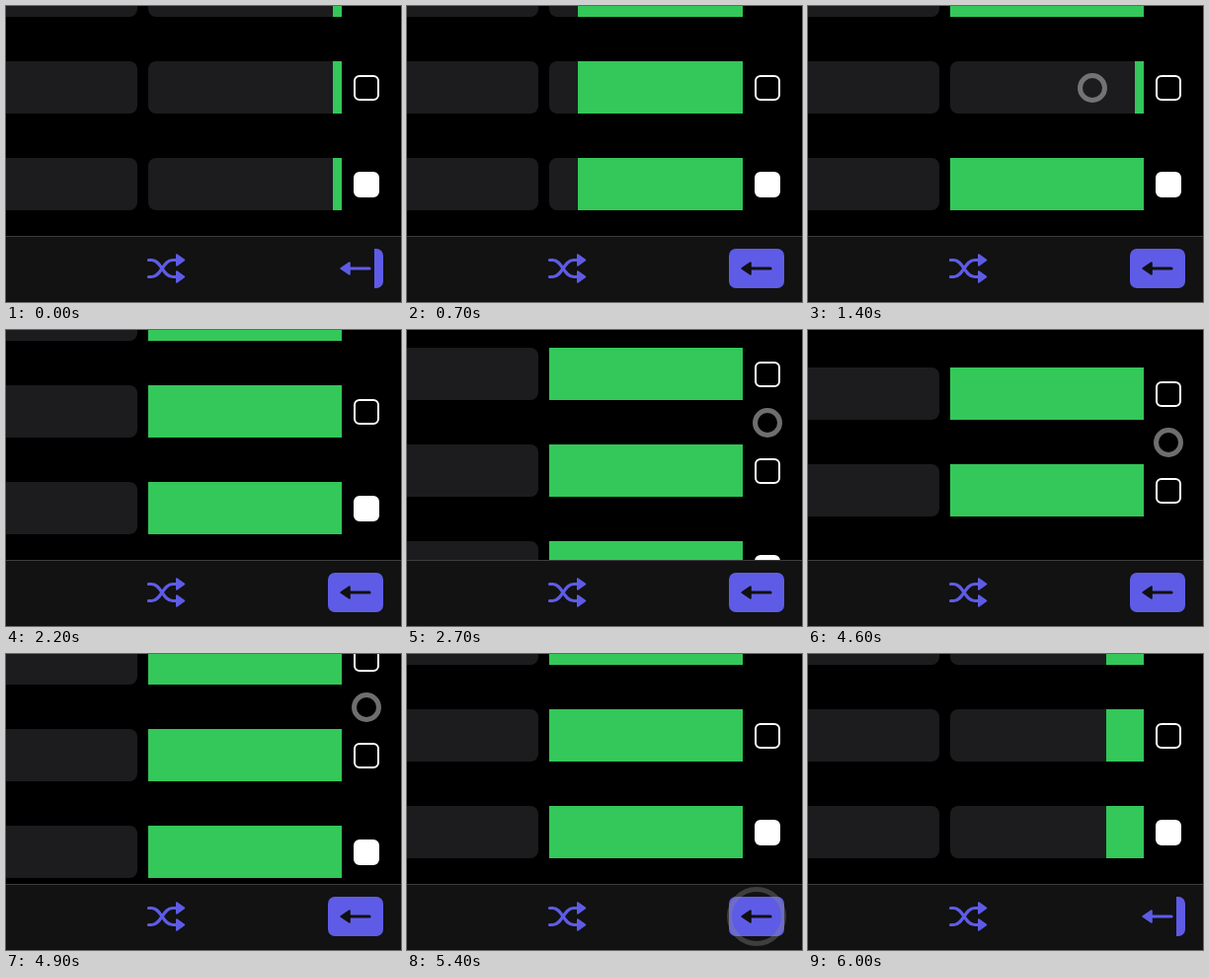
Write an HTML page that moves like this. It is 400 by 300 pixels and loops after 6100 ms.

```html
<!DOCTYPE html>
<html lang="en">
<head>
<meta charset="utf-8">
<title>Cover and peek</title>
<style>
  html, body { margin: 0; width: 100%; height: 100%; overflow: hidden; background: #000; }
  svg { display: block; width: 400px; height: 300px; }
  .card { fill: #1c1c1e; }
  .cover { fill: #34c759; }
  .box { fill: none; stroke: #fff; stroke-width: 2; }
  .box.on { fill: #fff; }
  .tint { fill: #5e5ce6; }
  .line { fill: none; stroke: #5e5ce6; stroke-width: 3.2; stroke-linecap: round; }
  .head { fill: #5e5ce6; stroke: #5e5ce6; stroke-width: 2; stroke-linejoin: round; }
  .dark .line, .dark .head { stroke: #111; }
  .dark .head { fill: #111; }
  #ring { fill: none; stroke: #8a8a8a; stroke-width: 5; }
</style>
</head>
<body>
<svg viewBox="0 0 400 300">
  <defs>
    <g id="arrow">
      <path class="line" d="M346 266H368"/>
      <path class="head" d="M339.3 266L347.8 260.3V271.7Z"/>
    </g>
    <g id="strand">
      <path class="line" d="M144.5 257.5H147.5C157.5 257.5 158.5 274.5 169 274.5H173"/>
      <path class="head" d="M173 269.2L180.3 274.5L173 279.8Z"/>
    </g>
    <clipPath id="slide"><rect id="edge" x="373" y="240" width="20" height="52"/></clipPath>
  </defs>
  <rect width="400" height="300"/>
  <g id="list"></g>
  <rect y="233" width="400" height="67" fill="#121212"/>
  <rect y="233" width="400" height="1" fill="#3d3d3f"/>
  <use href="#strand"/>
  <use href="#strand" transform="matrix(1 0 0 -1 0 532)"/>
  <use href="#arrow"/>
  <g clip-path="url(#slide)">
    <rect class="tint" x="326" y="246" width="56" height="40" rx="7"/>
    <g class="dark">
      <path class="line" d="M346 266H368"/>
      <path class="head" d="M339.3 266L347.8 260.3V271.7Z"/>
    </g>
  </g>
  <circle id="ring"/>
</svg>
<script>
const LOOP = 6100, TICK = 100;
const HIDE = 300, SHOW = 5600;
const el = id => document.getElementById(id);
const list = el('list'), ring = el('ring'), edge = el('edge');

// Each row may be peeked at while it is held: [open, close]
const rows = [
  { y: -42, peek: [3100, 3900] },
  { y: 56, peek: [900, 1700] },
  { y: 154, on: true }
];

const touches = [
  { x: 354, y: 266, down: 100, up: 300 },
  { x: 288, y: 83, down: 800, up: 1700 },
  { x: 365, y: 34, down: 2300, up: 2900, drag: true },
  { x: 288, y: 65, down: 3000, up: 3900 },
  { x: 365, y: 34, down: 4500, up: 5300, drag: true },
  { x: 354, y: 266, down: 5400, up: 5600 }
];

for (const row of rows) {
  list.insertAdjacentHTML('beforeend', `
    <g transform="translate(0 ${row.y})">
      <rect class="card" x="-20" width="153" height="53" rx="8"/>
      <rect class="card" x="144" width="196" height="53" rx="8"/>
      <rect class="cover" height="53"/>
      <rect class="box ${row.on ? 'on' : ''}" x="353" y="15" width="24" height="24" rx="5"/>
    </g>`);
  row.cover = list.lastElementChild.querySelector('.cover');
}

const progress = (t, from, span) => Math.min(1, Math.max(0, (t - from) / span));
const soft = p => p - 0.0485 * Math.sin(2 * Math.PI * p);
const cubic = p => p < 0.5 ? 4 * p ** 3 : 1 - 4 * (1 - p) ** 3;
const wipe = (t, from) => soft(progress(t, from, 500));

function draw(t) {
  const scroll = Math.round(80 * (cubic(progress(t, 2400, 500)) - cubic(progress(t, 4600, 500))));
  list.setAttribute('transform', `translate(0 ${scroll})`);

  const covered = wipe(t, HIDE) - wipe(t, SHOW);
  for (const { cover, peek } of rows) {
    const open = peek ? wipe(t, peek[0]) - wipe(t, peek[1]) : 0;
    const width = 9 + Math.round(187 * (covered - open));
    cover.setAttribute('x', 340 - width);
    cover.setAttribute('width', width);
  }

  const filled = soft(progress(t, HIDE, 300)) - soft(progress(t, SHOW, 300));
  const left = 373 - Math.round(47 * filled);
  edge.setAttribute('x', left);
  edge.setAttribute('width', 390 - left);

  const touch = touches.find(o => t >= o.down && t < o.up + TICK);
  ring.style.display = touch ? '' : 'none';
  if (touch) {
    const held = t >= touch.down + TICK && t < touch.up;
    ring.setAttribute('cx', touch.x);
    ring.setAttribute('cy', touch.y + (touch.drag ? scroll : 0));
    ring.setAttribute('r', held ? 12.5 : 27.5);
    ring.setAttribute('stroke-opacity', held ? 0.8 : 0.36);
  }
}

const start = performance.now();
function frame() {
  const t = (performance.now() - start) % LOOP;
  draw(Math.floor(t / TICK) * TICK);
  requestAnimationFrame(frame);
}
frame();
</script>
</body>
</html>
```
